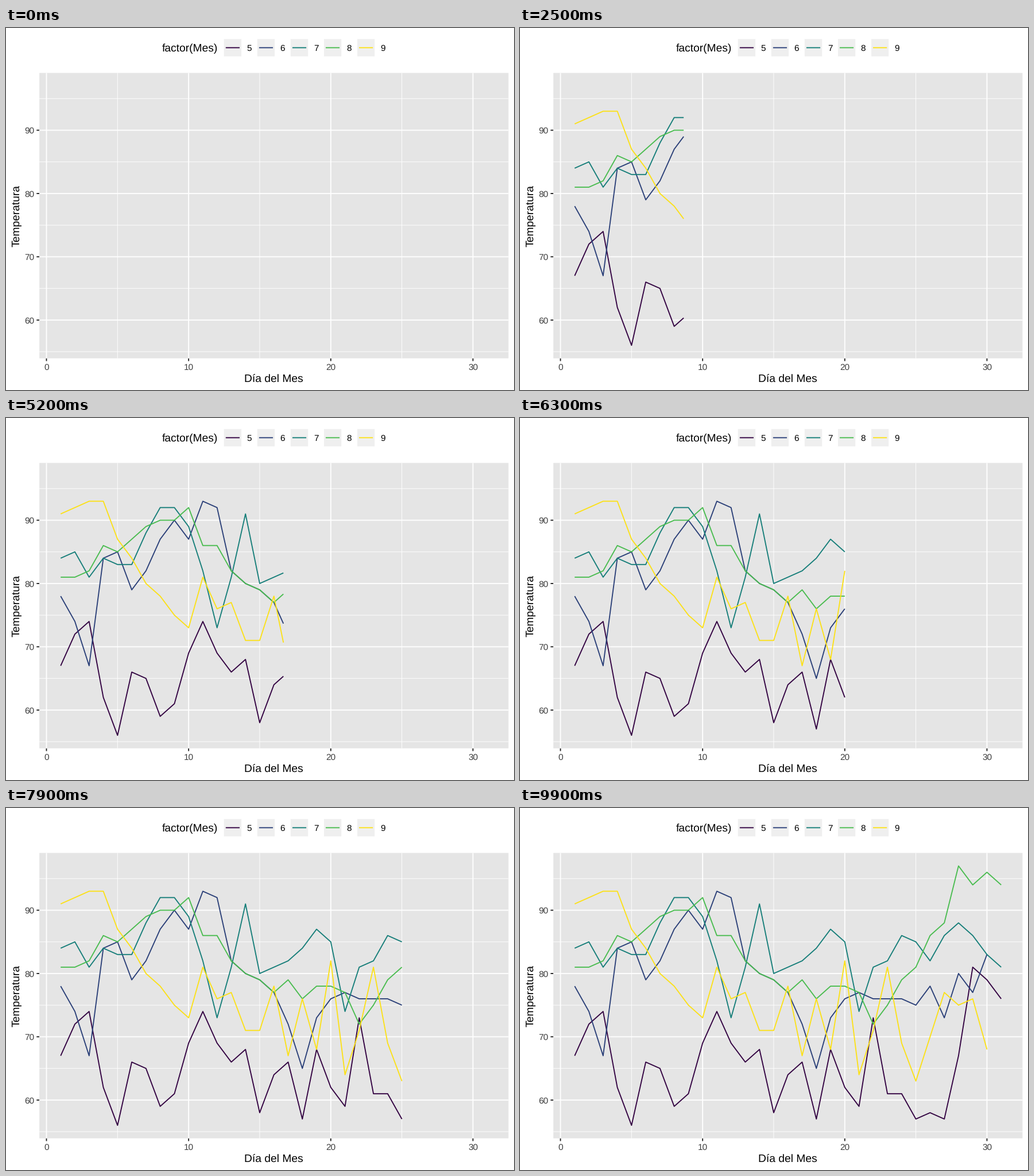
Animation of 885 by 632 pixels, one loop 10 s. Source, as a matplotlib script:

```python
import matplotlib.pyplot as plt
import numpy as np
from matplotlib.animation import FuncAnimation
from matplotlib.patches import Rectangle

W, H, DPI = 885, 632, 64
PT = 72 / DPI                # points per pixel
FRAMES = 100
LEFT, RIGHT, TOP, BOTTOM = 58.1, 875.4, 78.5, 576.7
TITLE, LABEL = 19.25, 15.4   # text sizes in pixels
THICK, THIN = 1.86, 0.93     # line widths in pixels
COLORS = ["#310040", "#293e77", "#147d78", "#48bc4e", "#fce117"]

# Daily temperatures, one list per month
may = [67, 72, 74, 62, 56, 66, 65, 59, 61, 69, 74, 69, 66, 68, 58, 64,
       66, 57, 68, 62, 59, 73, 61, 61, 57, 58, 57, 67, 81, 79, 76]
june = [78, 74, 67, 84, 85, 79, 82, 87, 90, 87, 93, 92, 82, 80, 79,
        77, 72, 65, 73, 76, 77, 76, 76, 76, 75, 78, 73, 80, 77, 83]
july = [84, 85, 81, 84, 83, 83, 88, 92, 92, 89, 82, 73, 81, 91, 80, 81,
        82, 84, 87, 85, 74, 81, 82, 86, 85, 82, 86, 88, 86, 83, 81]
august = [81, 81, 82, 86, 85, 87, 89, 90, 90, 92, 86, 86, 82, 80, 79, 77,
          79, 76, 78, 78, 77, 72, 75, 79, 81, 86, 88, 97, 94, 96, 94]
september = [91, 92, 93, 93, 87, 84, 80, 78, 75, 73, 81, 76, 77, 71, 71,
             78, 67, 76, 68, 82, 64, 71, 81, 69, 63, 70, 77, 75, 76, 68]
MONTHS = [may, june, july, august, september]

DAYS = np.arange(1, 32)
# Each day is reached on a whole frame; the tip moves evenly in between
DAY_FRAMES = [round((FRAMES - 1) * (d - 1) / 30) for d in range(1, 32)]

plt.rcParams["font.family"] = "Liberation Sans"
plt.rcParams["text.hinting"] = "none"

fig = plt.figure(figsize=(W / DPI, H / DPI), dpi=DPI, facecolor="white")
ax = fig.add_axes([0, 0, 1, 1])
ax.set_xlim(0, W)
ax.set_ylim(H, 0)
ax.axis("off")


def px(day):
    return LEFT + (np.asarray(day) + 0.5) * (RIGHT - LEFT) / 33


def py(temp):
    return TOP + (99.05 - np.asarray(temp)) * (BOTTOM - TOP) / 45.1


def line(xs, ys, color, width=THICK, z=2):
    return ax.plot(xs, ys, color=color, lw=width * PT, zorder=z, snap=False,
                   solid_capstyle="butt", solid_joinstyle="round")[0]


def box(x, y, w, h, color):
    ax.add_patch(Rectangle((x, y), w, h, fc=color, lw=0, zorder=1, snap=False))


def text(x, y, s, size, color="black", ha="center", rotation=0):
    ax.text(x, y, s, fontsize=size * PT, color=color, ha=ha, va="baseline",
            rotation=rotation, rotation_mode="anchor")


def draw_panel():
    box(LEFT, TOP, RIGHT - LEFT, BOTTOM - TOP, "#e5e5e5")
    for t in range(55, 100, 10):
        line([LEFT, RIGHT], [py(t)] * 2, "white", THIN)
    for d in (5, 15, 25):
        line([px(d)] * 2, [TOP, BOTTOM], "white", THIN)
    for t in (60, 70, 80, 90):
        y = py(t)
        line([LEFT, RIGHT], [y, y], "white", z=3)
        line([LEFT - 4.8, LEFT], [y, y], "#222222")
        text(LEFT - 8.7, y + 5.5, str(t), LABEL, "#3d3d3d", ha="right")
    for d in (0, 10, 20, 30):
        x = px(d)
        line([x, x], [TOP, BOTTOM], "white", z=3)
        line([x, x], [BOTTOM, BOTTOM + 4.8], "#222222")
        text(x, 596.5, str(d), LABEL, "#3d3d3d")
    text((LEFT + RIGHT) / 2, 618.4, "Día del Mes", TITLE)
    text(23.4, (TOP + BOTTOM) / 2, "Temperatura", TITLE, rotation=90)


def draw_legend():
    text(272, 41.2, "factor(Mes)", TITLE, ha="left")
    key, mid = 30.24, 34.4
    for i, color in enumerate(COLORS):
        x = 379.8 + 58.05 * i
        box(x, mid - key / 2, key, key, "#efefef")
        line([x + 0.1 * key, x + 0.9 * key], [mid, mid], color)
        text(x + key + 9.6, mid + 5.5, str(i + 5), LABEL, ha="left")


draw_panel()
draw_legend()
curves = [line([], [], c, z=4 + i) for i, c in enumerate(COLORS)]


def update(frame):
    tip = np.interp(frame, DAY_FRAMES, DAYS)
    for curve, temps in zip(curves, MONTHS):
        days = DAYS[:len(temps)]
        end = min(tip, days[-1])
        xs = np.append(days[days < end], end)
        if len(xs) < 2:
            curve.set_data([], [])
        else:
            curve.set_data(px(xs), py(np.interp(xs, days, temps)))
    return curves


anim = FuncAnimation(fig, update, frames=FRAMES, interval=100,
                     repeat=True, repeat_delay=0, blit=False)
plt.show()
```
